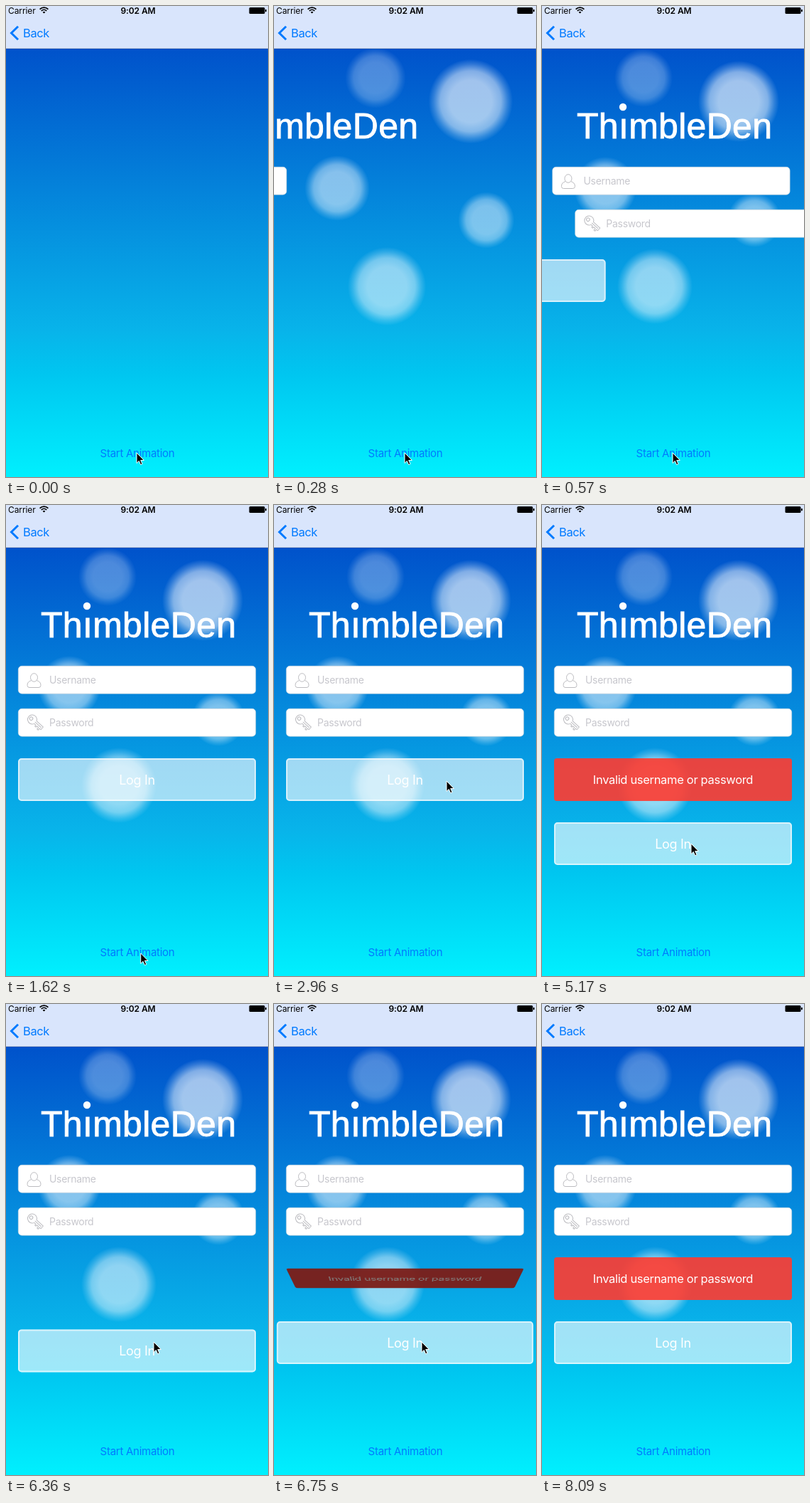
Write an HTML page that moves like this. It is 369 by 662 pixels and loops after 8570 ms.

```html
<!DOCTYPE html>
<html lang="en">
<head>
<meta charset="utf-8">
<title>Login screen</title>
<style>
  html, body { margin: 0; width: 100%; height: 100%; overflow: hidden; background: #00f0fe; }
  svg { position: absolute; left: 0; top: 0; width: 369px; height: 662px; display: block; }
  text, #error { font-family: Inter, "Open Sans", sans-serif; }
  .blue { fill: #007aff; }
  .field rect { fill: #fff; stroke: #c9d3da; stroke-width: .6; }
  .field text { font-size: 14px; letter-spacing: -.3px; fill: #c7c7cd; }
  .icon { fill: none; stroke: #bcbcc0; stroke-width: 1; stroke-linejoin: round; }
  .title { font: 50px "Liberation Sans", Arial, sans-serif; letter-spacing: .3px; stroke: #fff; stroke-width: .9; }
  #error {
    position: absolute; left: 17px; top: 356px; width: 335px; height: 60px;
    border-radius: 4px; overflow: hidden; background: rgba(255, 59, 48, .9);
    color: #fff; font-size: 16.5px; letter-spacing: -.32px; line-height: 60px;
    text-align: center; white-space: nowrap;
  }
  #shade { position: absolute; inset: 0; background: #000; }
</style>
</head>
<body>
<svg viewBox="0 0 369 662">
  <defs>
    <linearGradient id="sky" x1="0" y1="0" x2="0" y2="1">
      <stop offset="0" stop-color="#0052cb"/>
      <stop offset=".66" stop-color="#08b4ea"/>
      <stop offset=".76" stop-color="#00c6f0"/>
      <stop offset="1" stop-color="#00f0fe"/>
    </linearGradient>
    <radialGradient id="glow">
      <stop offset=".5" stop-color="#fff"/>
      <stop offset=".72" stop-color="#fff" stop-opacity=".8"/>
      <stop offset=".88" stop-color="#fff" stop-opacity=".3"/>
      <stop offset="1" stop-color="#fff" stop-opacity="0"/>
    </radialGradient>
  </defs>
  <rect y="60" width="369" height="602" fill="url(#sky)"/>
  <g id="bubbles"></g>

  <g id="title" fill="#fff">
    <text class="title" x="49" y="186">Thımbleden</text>
    <circle cx="114" cy="142" r="5.2"/>
  </g>

  <g id="user" class="field">
    <rect x="17.3" y="226.3" width="334.4" height="38.9" rx="5"/>
    <g class="icon">
      <ellipse cx="39.5" cy="242.5" rx="5" ry="5.8"/>
      <path d="M35.6 246.6C32 248 30 249.500 30 253.500Q30 256.500 33 256.500H46Q49 256.500 49 253.500C49 249.500 47 248 43.400 246.600"/>
    </g>
    <text x="61" y="250.500">Username</text>
  </g>

  <g id="pass" class="field">
    <rect x="17.3" y="286.3" width="334.4" height="38.9" rx="5"/>
    <g class="icon" transform="translate(37 301.500) rotate(42)">
      <path d="M6 -2.500A6.500 6.500 0 1 0 6 2.500H9V4.500H11V2.500H14V5.500H16V2.500H18.500V-2.500Z"/>
      <circle cx="-2" r="2.300"/>
      <path d="M5 0H17"/>
    </g>
    <text x="61" y="310.500">Password</text>
  </g>

  <g id="login">
    <rect id="face" y="0" height="60" rx="5" fill="#fff" fill-opacity=".62"/>
    <rect id="rim" y="1" height="58" rx="4" fill="none" stroke="#fff" stroke-opacity=".6" stroke-width="2"/>
    <text y="36.500" font-size="18" letter-spacing="-.3" text-anchor="middle" fill="#fff">Log In</text>
  </g>

  <text class="blue" x="185" y="633.500" font-size="15" letter-spacing="-.27" text-anchor="middle">Start Animation</text>

  <rect width="369" height="60" fill="#d9e5fc"/>
  <rect y="59.500" width="369" height=".7" fill="#000" fill-opacity=".3"/>
  <text x="3" y="10.800" font-size="12" letter-spacing="-.1">Carrier</text>
  <g transform="translate(53.500 10.500)" fill="none" stroke="#000" stroke-width="1.700">
    <path d="M-5.900 -5.900A8.300 8.300 0 0 1 5.900 -5.900M-3.700 -3.700A5.200 5.200 0 0 1 3.700 -3.700"/>
    <path d="M0 0L-1.900 -1.900A2.700 2.700 0 0 1 1.900 -1.900Z" fill="#000" stroke="none"/>
  </g>
  <text x="186" y="10.800" font-size="12" font-weight="600" letter-spacing="-.1" text-anchor="middle">9:02 AM</text>
  <rect x="342.500" y="2" width="22" height="9" rx="1.500"/>
  <rect x="365" y="4.700" width="1.800" height="3.600" rx=".8"/>
  <path d="M17 28.700L7.500 38L17 47.300" fill="none" stroke="#007aff" stroke-width="3"/>
  <text class="blue" x="24" y="44" font-size="16.500" letter-spacing="-.4">Back</text>
</svg>

<div id="error">Invalid username or password<div id="shade"></div></div>

<svg viewBox="0 0 369 662">
  <path id="cursor" d="M0 0V14.500L3.300 11.400L5.600 16.700L8 15.700L5.700 10.500H10.300Z" stroke="#fff" stroke-width="1" stroke-linejoin="round"/>
</svg>

<script>
const LOOP = 8570, MID = 184.5;
const $ = id => document.getElementById(id);
const clamp = v => Math.min(1, Math.max(0, v));
$('title').firstElementChild.textContent = 'ThımbleDen';

function bezier(x1, y1, x2, y2) {
  const at = (a, b, s) => 3 * a * s * (1 - s) ** 2 + 3 * b * s * s * (1 - s) + s ** 3;
  return x => {
    if (x <= 0) return 0;
    if (x >= 1) return 1;
    let lo = 0, hi = 1;
    for (let i = 0; i < 24; i++) {
      const s = (lo + hi) / 2;
      if (at(x1, x2, s) < x) lo = s; else hi = s;
    }
    return at(y1, y2, lo);
  };
}
const ease = bezier(.25, .1, .25, 1);
const easeOut = bezier(0, 0, .58, 1);
const easeInOut = bezier(.42, 0, .58, 1);

// Damped spring from 0 to 1 that settles within dur
function spring(t, damping, dur) {
  if (t <= 0) return 0;
  if (t >= dur) return 1;
  const decay = 6.9 / dur;
  const w = decay / damping * Math.sqrt(1 - damping * damping);
  return 1 - Math.exp(-decay * t) * (Math.cos(w * t) + decay / w * Math.sin(w * t));
}

// x, y, radius, opacity
const bubbles = [
  [143, 101, 41, .3], [277, 134, 57, .63], [89, 256, 44, .52],
  [299, 301, 38, .48], [159, 394, 53, .55]
].map(([x, y, r, alpha]) => {
  const c = document.createElementNS('http://www.w3.org/2000/svg', 'circle');
  const attrs = { cx: x, cy: y, fill: 'url(#glow)', opacity: alpha };
  for (const k in attrs) c.setAttribute(k, attrs[k]);
  $('bubbles').append(c);
  return { c, r };
});

// time, x, y of the pointer tip
const pointer = [
  [0, 184, 628], [1590, 184, 628], [1790, 302, 670], [2449, 302, 670],
  [2450, 300, 587], [2940, 243, 388], [4080, 243, 388], [4850, 210, 476],
  [6040, 210, 476], [6080, 208, 475], [7150, 208, 475], [7480, 250, 670], [LOOP, 250, 670]
];
function pointerAt(t) {
  const i = pointer.findIndex(k => k[0] > t);
  const [t0, x0, y0] = pointer[i - 1], [t1, x1, y1] = pointer[i];
  const p = easeInOut((t - t0) / (t1 - t0));
  return [x0 + (x1 - x0) * p, y0 + (y1 - y0) * p];
}

const CLICKS = [3195, 6130], POP = 506;
const move = (id, x, y) => $(id).setAttribute('transform', `translate(${x} ${y})`);
const slide = (t, start, from) => from * (1 - easeInOut((t - start) / 400));

function drawLogin(t) {
  const drop = c => spring((t - c) / 1000, .6, .5);
  let y = 356 + 90 * drop(CLICKS[0]);
  if (t > CLICKS[1]) y += 90 * (drop(CLICKS[1]) - easeOut((t - CLICKS[1]) / 300));

  let w = 335;
  for (const c of CLICKS) {
    const s = (t - c - POP) / 1000;
    if (s >= 0) w -= 60 * (1 - spring(s, .2, 1.5));
  }
  $('face').setAttribute('x', -w / 2);
  $('face').setAttribute('width', w);
  $('rim').setAttribute('x', 1 - w / 2);
  $('rim').setAttribute('width', w - 2);
  move('login', MID + slide(t, 422, -369), y);
}

function drawError(t) {
  const click = t >= CLICKS[1] ? CLICKS[1] : CLICKS[0];
  const tilt = 180 * (1 - ease((t - click - POP) / 300));
  const depth = 30 * Math.sin(tilt * Math.PI / 180);
  $('error').style.visibility = tilt < 90 ? 'visible' : 'hidden';
  $('error').style.transform = tilt > 0
    ? `perspective(600px) translateZ(${-depth}px) rotateX(${-tilt}deg)` : 'none';
  $('shade').style.opacity = clamp(tilt / 125);
}

function draw(t) {
  bubbles.forEach(({ c, r }) => c.setAttribute('r', r * spring((t - 30) / 1000, .7, .5)));
  move('title', slide(t, 40, -369), 0);
  move('user', slide(t, 195, -369), 0);
  move('pass', slide(t, 250, 369), 0);
  drawLogin(t);
  drawError(t);
  move('cursor', ...pointerAt(t));
}

const start = performance.now();
function tick() {
  draw((performance.now() - start) % LOOP);
  requestAnimationFrame(tick);
}
tick();
</script>
</body>
</html>
```
